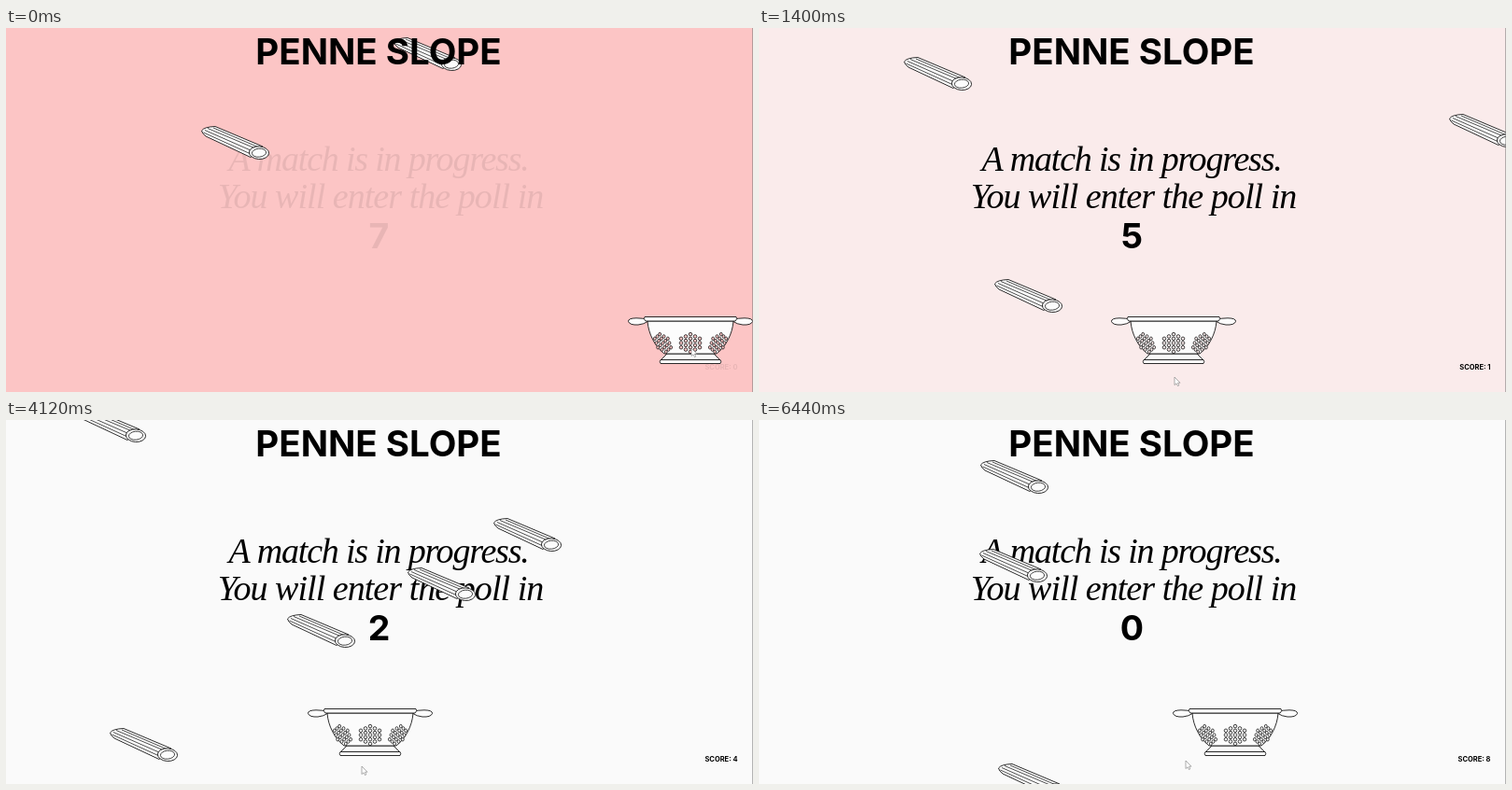
These frames come from a looping animation (800 by 390 pixels, 6480 ms). An HTML page with a canvas:

```html
<!DOCTYPE html>
<html lang="en">
<head>
<meta charset="utf-8">
<title>Penne Slope</title>
<style>
  html, body { margin: 0; width: 100%; height: 100%; overflow: hidden; background: #fafafa; }
  canvas { display: block; width: 800px; height: 390px; }
</style>
</head>
<body>
<canvas id="stage" width="800" height="390"></canvas>
<script>
const ctx = document.getElementById('stage').getContext('2d');
const LOOP = 6480, STEP = 40, FALL = 0.243;
const SANS = 'Inter, "Liberation Sans", sans-serif';
const SERIF = '"Liberation Serif", "Noto Serif", serif';

// Key lists are flat: time, value, time, value...
const BOWL_X = [80, 733, 200, 700, 440, 558, 520, 555, 920, 543, 1000, 543, 1160, 495,
  1400, 444, 1480, 444, 1600, 300, 1700, 288, 2100, 690, 2300, 722, 2720, 705, 2800, 690,
  3000, 375, 3080, 359, 3160, 360, 3600, 400, 4120, 390, 4480, 345, 4700, 466, 4920, 556,
  5160, 576, 5240, 578, 5640, 590, 6320, 593, 6440, 510, 6520, 456];
const MOUSE_Y = [0, 343, 440, 355, 920, 377, 1400, 374, 3080, 361, 5160, 381, 6440, 365];
const FLUSH = [0, .3, 200, .6, 440, .84, 920, .99, 1000, 1, 1120, .7, 1400, .085, 1600, 0];
const REVEAL = [0, .08, 120, .3, 280, 1];
const CATCHES = [1160, 1560, 2240, 3600, 4480, 4720, 4920, 6160];

// x, height keys, time of the catch
const DROPS = [
  { x: 209, y: [0, 105, 440, 212, 920, 328] },
  { x: 415, y: [0, 10, 440, 121, 920, 234], end: 1160 },
  { x: 252, y: [440, 39, 920, 143, 1400, 269], end: 1560 },
  { x: 739, y: [920, -32, 1400, 92], end: 2240 },
  { x: 155, y: [1400, 31] },
  { x: -16, y: [3080, 304] },
  { x: 373, y: [3080, 170], end: 3600 },
  { x: 111, y: [3080, 122, 4120, 330] },
  { x: 301, y: [3080, 0, 4120, 208], end: 4480 },
  { x: 430, y: [4120, 158], end: 4720 },
  { x: 522, y: [4120, 105], end: 4920 },
  { x: 77, y: [4120, -12, 5160, 221] },
  { x: 42, y: [5160, 203] },
  { x: 256, y: [5160, 50, 6440, 368] },
  { x: 529, y: [5160, 44], end: 6160 },
  { x: 236, y: [6440, 138] },
  { x: 237, y: [6440, 43] }
];

// Linear between keys; beyond the ends it goes on with the given slope.
function at(keys, t, slope = 0) {
  const n = keys.length;
  if (t <= keys[0]) return keys[1] + (t - keys[0]) * slope;
  for (let i = 2; i < n; i += 2) {
    if (t <= keys[i]) {
      const k = (t - keys[i - 2]) / (keys[i] - keys[i - 2]);
      return keys[i - 1] + (keys[i + 1] - keys[i - 1]) * k;
    }
  }
  return keys[n - 1] + (t - keys[n - 2]) * slope;
}

function ink(path, fill, width = 0.9) {
  if (fill) {
    ctx.fillStyle = fill;
    ctx.fill(path);
  }
  ctx.lineWidth = width;
  ctx.strokeStyle = '#161616';
  ctx.stroke(path);
}

function ellipse(x, y, rx, ry, turn = 0) {
  const p = new Path2D();
  p.ellipse(x, y, rx, ry, turn, 0, Math.PI * 2);
  return p;
}

const TUBE = new Path2D('M0.5 5 Q3 1 15 .5 L66 22 L53 33.5 L5 11 Q1 8 .5 5Z');
const RIDGES = new Path2D('M13 2 L62 23 M7 2.5 L58 24 M4 4.5 L54 26.5 M2.5 7 L52 29.5');
const MOUTH = ellipse(62, 28.7, 10.6, 6.8, 0.06);
const HOLE = ellipse(62, 28.7, 7.6, 4.5, -0.1);

function drawPenne(x, y) {
  ctx.save();
  ctx.translate(x, y);
  ink(TUBE, '#fcfcfc');
  ink(RIDGES, null, 0.75);
  ink(MOUTH, '#fcfcfc');
  ink(HOLE, '#fcfcfc', 0.8);
  ctx.restore();
}

const BOWL = new Path2D('M-46 314 C-45 328 -38 341 -28 349 L28 349 C38 341 45 328 46 314Z');
const RIM = new Path2D('M-49 309.5 H49 Q51 311.5 48 314 H-48 Q-51 311.5 -49 309.5Z');
const GRIP = new Path2D('M45 312 Q52 311 58 310.8 Q67 311 66.5 314.5 Q65 318.5 56 318 Q50 317.5 45 314Z');
const FOOT = new Path2D('M-25 349 H25 L32 356 H-32Z');
const BASE = new Path2D('M-32 355.5 H32 Q33.5 357.5 32 359.5 H-32 Q-33.5 357.5 -32 355.5Z');

function drawHoles(side, bg) {
  for (let col = -2; col <= 2; col++) {
    const count = 5 - Math.abs(col);
    for (let i = 0; i < count; i++) {
      const dy = (i - (count - 1) / 2) * 4.7;
      const x = side * (29.5 - dy * 0.35) + col * (side ? 3.5 : 5);
      ink(ellipse(x, 337.5 + dy, side ? 1.4 : 1.8, 1.8), bg, 0.8);
    }
  }
}

function drawBowl(x, bg) {
  ctx.save();
  ctx.translate(x, 0);
  ink(GRIP, '#fcfcfc');
  ctx.scale(-1, 1);
  ink(GRIP, '#fcfcfc');
  ctx.scale(-1, 1);
  [FOOT, BASE, BOWL, RIM].forEach(p => ink(p, '#fcfcfc'));
  [-1, 0, 1].forEach(side => drawHoles(side, bg));
  ctx.restore();
}

const ARROW = new Path2D('M0 0 V8.5 L2 6.8 L3.4 9.5 L4.8 8.9 L3.5 6.2 H6Z');

function drawMouse(x, y) {
  ctx.save();
  ctx.translate(x, y);
  ctx.fillStyle = '#fff';
  ctx.fill(ARROW);
  ctx.lineWidth = 0.6;
  ctx.strokeStyle = '#777';
  ctx.stroke(ARROW);
  ctx.restore();
}

function write(text, x, y, font, spacing = 0, align = 'center') {
  ctx.font = font;
  ctx.letterSpacing = spacing + 'px';
  ctx.textAlign = align;
  ctx.fillStyle = '#000';
  ctx.fillText(text, x, y);
}

function draw(t) {
  const flush = at(FLUSH, t);
  const low = Math.round(250 - 178 * flush);
  const bg = `rgb(${Math.round(250 + 5 * flush)},${low},${low})`;
  ctx.fillStyle = bg;
  ctx.fillRect(0, 0, 800, 390);

  const count = 7 - Math.max(0, Math.floor((t - 120) / 1000) + 1);
  const score = CATCHES.filter(c => c <= t).length;
  ctx.globalAlpha = at(REVEAL, Math.min(t, 280));
  write('A match is in progress.', 399, 153, `italic 38px ${SERIF}`, -1.2);
  write('You will enter the poll in', 401, 193, `italic 38px ${SERIF}`, -0.95);
  write(count, 399.5, 236, `700 37.5px ${SANS}`);
  write('SCORE: ' + score, 783.5, 365.5, `700 7.5px ${SANS}`, 0, 'right');
  ctx.globalAlpha = 1;

  for (const d of DROPS) {
    const y = at(d.y, t, FALL);
    if (y > -38 && y < 392 && !(t >= d.end)) drawPenne(d.x, y);
  }
  drawBowl(at(BOWL_X, t), bg);
  write('PENNE SLOPE', 399, 38.5, `700 38.5px ${SANS}`);
  drawMouse(at(BOWL_X, t + 80) + 1, at(MOUSE_Y, t));

  ctx.fillStyle = 'rgba(120,120,120,.55)';
  ctx.fillRect(799, 0, 1, 390);
}

const start = performance.now();

function tick() {
  let t = Math.floor(((performance.now() - start) % LOOP) / STEP) * STEP;
  // short stall in the game
  if (t >= 4120 && t < 4320) t = 4120;
  else if (t === 4080) t = 4040;
  draw(t);
  requestAnimationFrame(tick);
}
tick();
</script>
</body>
</html>
```
